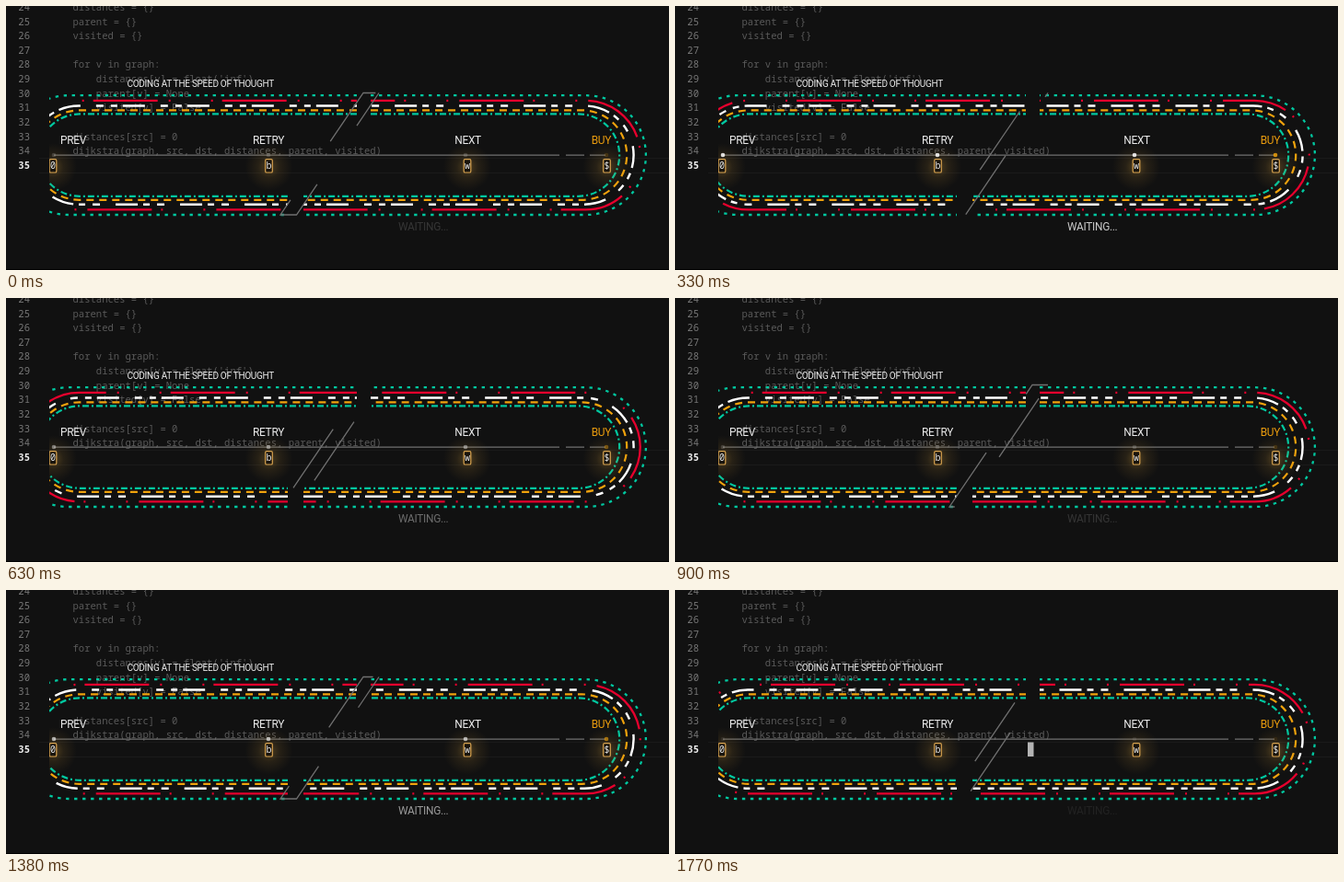
Write an HTML page that moves like this. It is 720 px wide and 287 px high and loops after 1800 ms.

```html
<!DOCTYPE html>
<html lang="en">
<head>
<meta charset="utf-8">
<title>Neon track</title>
<style>
  html, body { margin: 0; width: 100%; height: 100%; overflow: hidden; background: #111; }
  svg { display: block; width: 720px; height: 287px; }
  .mono { font: 10.56px "Noto Sans Mono", "DejaVu Sans Mono", monospace; }
  .code { fill: #5a5a5a; }
  .num { fill: #777; text-anchor: end; }
  .num.now { fill: #ececec; font-weight: 600; }
  .label { font: 11.9px Roboto, Inter, sans-serif; letter-spacing: -.3px; fill: #ececec; }
  .title { font-size: 10px; letter-spacing: -.28px; }
  .key { font: 500 10px "Noto Sans Mono", "DejaVu Sans Mono", monospace; fill: #e6e6e6; text-anchor: middle; }
  .rail { stroke: #707070; stroke-width: 1.2; fill: none; }
  .cap { fill: #19140c; stroke: #d9a450; stroke-width: 1.2; }
</style>
</head>
<body>
<svg id="stage" viewBox="0 0 720 287">
  <defs>
    <radialGradient id="glow">
      <stop offset="0" stop-color="#d9a441" stop-opacity=".34"/>
      <stop offset=".45" stop-color="#b98a35" stop-opacity=".13"/>
      <stop offset="1" stop-color="#a87a2c" stop-opacity="0"/>
    </radialGradient>
    <clipPath id="panel"><rect x="47" y="0" width="673" height="287"/></clipPath>
  </defs>
  <rect width="720" height="287" fill="#111"/>
  <rect y="286" width="720" height="1" fill="#000"/>
  <path d="M36 165.5H720M36 181.5H720" stroke="#1a1a1a"/>
  <g id="editor"></g>
  <rect id="caret" x="383" y="165.5" width="6.5" height="15.5" fill="#b4b4b4"/>
  <g id="neon" clip-path="url(#panel)"></g>
</svg>
<script>
const LOOP = 1800, BEAT = 900, MID = 162.1;
const editor = document.getElementById('editor');
const neon = document.getElementById('neon');
const caret = document.getElementById('caret');

function add(parent, tag, attrs, text) {
  const el = document.createElementNS('http://www.w3.org/2000/svg', tag);
  for (const k in attrs) el.setAttribute(k, attrs[k]);
  if (text) el.textContent = text;
  parent.appendChild(el);
  return el;
}

// Editor lines 24 to 35
const lines = [
  'distances = {}', 'parent = {}', 'visited = {}', '',
  'for v in graph:', "    distances[v] = float('inf')", '    parent[v] = None',
  '    visited[v] = False', '', 'distances[src] = 0',
  'dijkstra(graph, src, dst, distances, parent, visited)', ''
];
lines.forEach((line, i) => {
  const y = 176.8 - (11 - i) * 15.63;
  const code = line.trimStart();
  const x = 72.5 + (line.length - code.length) * 6.336;
  add(editor, 'text', { class: 'mono num' + (i === 11 ? ' now' : ''), x: 26, y }, String(24 + i));
  if (code) add(editor, 'text', { class: 'mono code', x, y }, code);
});

// Each track: radius, left and right centres, dash pattern, first dash on each side, speed in px per beat
const tracks = [
  { r: 64.9, left: 68, right: 630, color: '#00c8a0', width: 2.3, dash: [3.4, 5.6], from: [0, 0], run: 18 },
  { r: 59.3, left: 79.5, right: 629.5, color: '#e6002d', width: 2.3, dash: [70, 10, 2, 44, 2, 12], from: [216, 96], run: 280 },
  { r: 53.6, left: 79, right: 628, color: '#fff', width: 2.4, dash: [24, 6, 7, 8, 8, 17], from: [300, 26], run: 140 },
  { r: 48.7, left: 79.5, right: 625.5, color: '#f0a20c', width: 2.2, dash: [8, 6], from: [0, 0], run: 28 },
  { r: 44.7, left: 80, right: 621.5, color: '#00c8a0', width: 2.2, dash: [7, 3, 2, 3], from: [0, 0], run: 30 }
];
const moving = [];

function half(track, start, centre, end, sweep, from) {
  const { r, color, width, dash, run } = track;
  const top = MID - r, bottom = MID + r;
  const el = add(neon, 'path', {
    d: `M${start} ${top}H${centre}A${r} ${r} 0 0 ${sweep} ${centre} ${bottom}H${end}`,
    fill: 'none', stroke: color, 'stroke-width': width, 'stroke-dasharray': dash.join(' ')
  });
  moving.push({ el, from, speed: run / BEAT });
}
for (const track of tracks) {
  half(track, 381, track.left, 306, 0, track.from[0]);
  half(track, 396, track.right, 323, 1, track.from[1]);
}

// Slash outline, drawn from its top right corner
const slash = add(neon, 'path', {
  d: 'M405 94.5L315.5 227H298L388 94.5H405', fill: 'none', stroke: '#707070',
  'stroke-width': 1.3, 'stroke-dasharray': '77 77'
});
moving.push({ el: slash, from: 120, speed: -0.1136 });

// Rail, keys and labels
add(neon, 'path', { class: 'rail', d: 'M52 162.2H601M608 162.2H628M634 162.2H651' });
const keys = [
  ['PREV', 59, '0', 51, 52], ['RETRY', 268, 'b', 285.5, 285],
  ['NEXT', 487.3, 'w', 501, 499], ['BUY', 635.7, '$', 652.5, 652]
];
const pulsing = [];
keys.forEach(([name, x, char, keyX, dotX], i) => {
  const last = i === 3;
  add(neon, 'circle', { cx: keyX, cy: 175, r: 26, fill: 'url(#glow)' });
  add(neon, 'rect', { class: 'cap', x: keyX - 3.8, y: 166.6, width: 7.6, height: 14.4, rx: 1.3 });
  add(neon, 'text', { class: 'key', x: keyX, y: 177.2 }, char);
  const label = add(neon, 'text', { class: 'label', x, y: 150.4 }, name);
  if (last) label.style.fill = '#eb9d0e';
  pulsing.push(add(neon, 'circle', { cx: dotX, cy: 162, r: 2.3, fill: last ? '#f0a20c' : '#fff' }));
});
add(neon, 'text', { class: 'label title', x: 131.5, y: 88.4 }, 'CODING AT THE SPEED OF THOUGHT');
pulsing.push(add(neon, 'text', { class: 'label', x: 426, y: 243.6 }, 'WAITING...'));

// Rises for 300 ms, fades for 600 ms
function pulse(t) {
  const p = (t + 30) % BEAT;
  const level = p < 300 ? p / 300 : (BEAT - p) / 600;
  return 0.07 + 0.86 * level;
}

function draw(t) {
  for (const { el, from, speed } of moving) {
    el.setAttribute('stroke-dashoffset', (-from - speed * t).toFixed(2));
  }
  const level = pulse(t).toFixed(3);
  for (const el of pulsing) el.setAttribute('opacity', level);
  caret.setAttribute('visibility', t >= 1680 ? 'visible' : 'hidden');
}

const begin = performance.now();
function tick() {
  draw((performance.now() - begin) % LOOP);
  requestAnimationFrame(tick);
}
draw(0);
requestAnimationFrame(tick);
</script>
</body>
</html>
```
